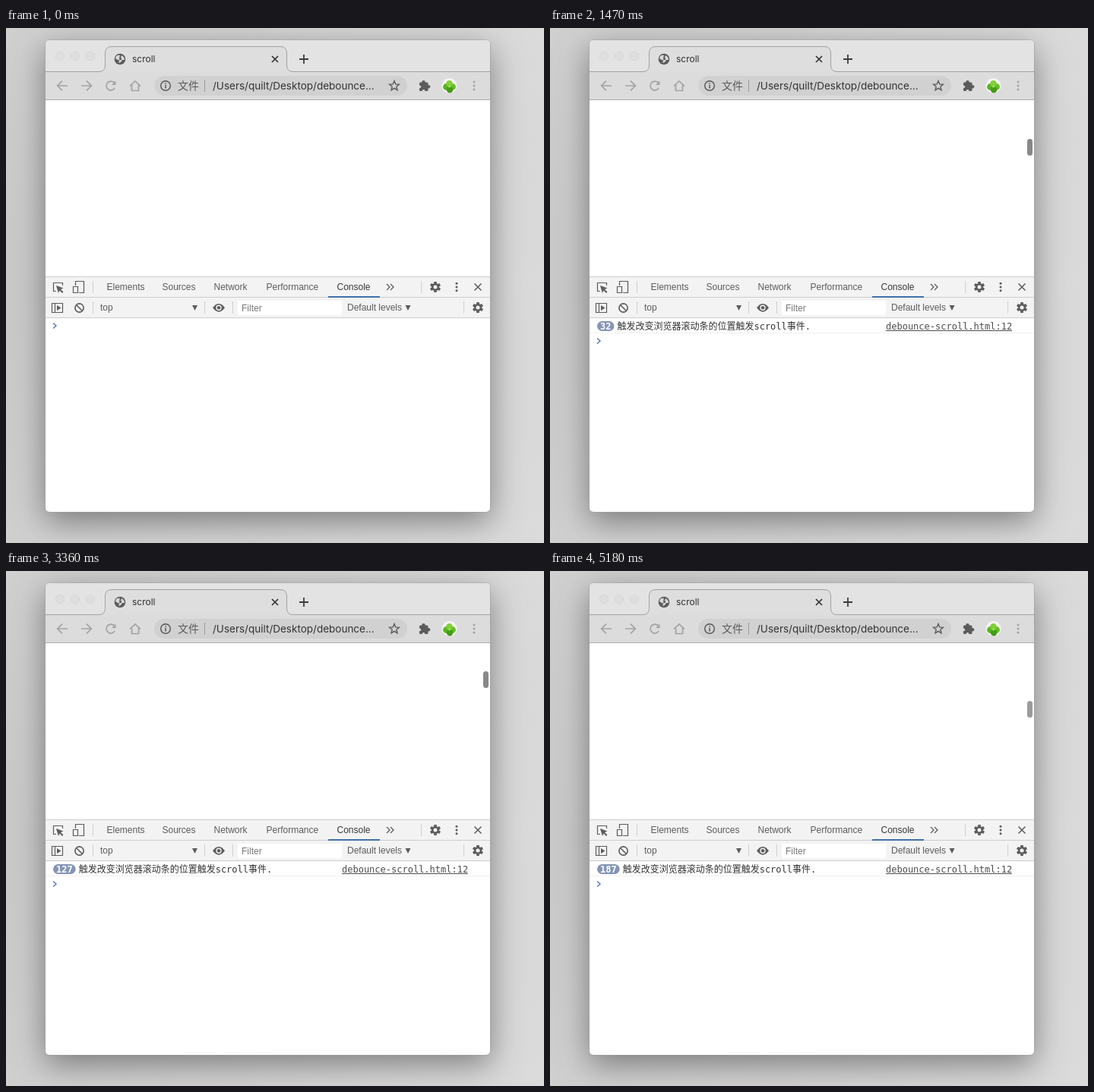
An HTML page with a canvas for the animation above (5.25 s loop, 708x678 px).

```html
<!DOCTYPE html>
<html lang="zh">
<head>
<meta charset="utf-8">
<title>scroll</title>
<style>
html, body { margin: 0; width: 708px; height: 678px; overflow: hidden; background: #d0d0d0; }
canvas { display: block; width: 708px; height: 678px; }
</style>
</head>
<body>
<canvas id="stage" width="708" height="678"></canvas>
<script>
const ctx = document.getElementById('stage').getContext('2d');
const LOOP = 5250, STEP = 70, TAU = Math.PI * 2;
const UI = 'Inter, "Noto Sans CJK SC", "Noto Sans CJK", sans-serif';
const SANS = '"Liberation Sans", Arial, sans-serif';
const MONO = '"DejaVu Sans Mono", "Noto Sans CJK SC", "Noto Sans CJK", monospace';
const INK = '#5c5c5c', FAINT = '#a3a3a3';

// time, logged events, scrollbar thumb top
const KEYS = [
  [770, 0, 97], [1470, 32, 146], [2660, 88, 185],
  [3360, 127, 132], [4200, 164, 158], [4690, 187, 171]
];

function scrollAt(t) {
  if (t <= KEYS[0][0]) return { count: 0, top: 97 };
  for (let i = 1; i < KEYS.length; i++) {
    const [t0, c0, y0] = KEYS[i - 1], [t1, c1, y1] = KEYS[i];
    if (t <= t1) {
      const p = (t - t0) / (t1 - t0);
      const e = i === 1 ? p : (1 - Math.cos(Math.PI * p)) / 2;
      return { count: Math.round(c0 + (c1 - c0) * p), top: Math.round(y0 + (y1 - y0) * e) };
    }
  }
  return { count: 187, top: 171 };
}

function rect(x, y, w, h, fill) {
  ctx.fillStyle = fill;
  ctx.fillRect(x, y, w, h);
}

function pill(x, y, w, h, r, fill) {
  ctx.beginPath();
  ctx.roundRect(x, y, w, h, r);
  ctx.fillStyle = fill;
  ctx.fill();
}

function disc(x, y, r, fill) {
  ctx.beginPath();
  ctx.arc(x, y, r, 0, TAU);
  ctx.fillStyle = fill;
  ctx.fill();
}

function ring(x, y, r, color, width = 1.5, from = 0, to = TAU) {
  ctx.beginPath();
  ctx.arc(x, y, r, from, to);
  ctx.strokeStyle = color;
  ctx.lineWidth = width;
  ctx.stroke();
}

function stroke(path, color, width = 1.5) {
  ctx.strokeStyle = color;
  ctx.lineWidth = width;
  ctx.stroke(new Path2D(path));
}

function fill(path, color) {
  ctx.fillStyle = color;
  ctx.fill(new Path2D(path));
}

function text(s, x, y, font, color) {
  ctx.font = font;
  ctx.fillStyle = color;
  ctx.fillText(s, x, y);
}

function gradient(x0, y0, x1, y1, ...colors) {
  const g = ctx.createLinearGradient(x0, y0, x1, y1);
  colors.forEach((c, i) => g.addColorStop(i / (colors.length - 1), c));
  return g;
}

function dots(x, y, gap, r, color) {
  for (let i = -1; i < 2; i++) disc(x, y + i * gap, r, color);
}

function gear(x, y) {
  ctx.beginPath();
  for (let i = 0; i < 6; i++) {
    const a = i * TAU / 6 + TAU / 12;
    [[-.36, 5.2], [-.25, 7.3], [.25, 7.3], [.36, 5.2]].forEach(([d, r]) =>
      ctx.lineTo(x + Math.cos(a + d) * r, y + Math.sin(a + d) * r));
  }
  ctx.closePath();
  ctx.moveTo(x + 2.5, y);
  ctx.arc(x, y, 2.5, 0, TAU, true);
  ctx.fillStyle = INK;
  ctx.fill('evenodd');
}

function star(x, y) {
  ctx.beginPath();
  for (let i = 0; i < 10; i++) {
    const a = i * TAU / 10 - TAU / 4, r = i % 2 ? 3 : 6.7;
    ctx.lineTo(x + Math.cos(a) * r, y + Math.sin(a) * r);
  }
  ctx.closePath();
  ctx.strokeStyle = INK;
  ctx.lineWidth = 1.4;
  ctx.stroke();
}

function backdrop() {
  rect(0, 0, 708, 678, gradient(0, 0, 708, 0, '#c9c9c9', '#d0d0d0', '#dadada'));
  rect(0, 0, 708, 678, gradient(0, 0, 0, 678, 'rgba(220,220,220,.35)', 'rgba(205,205,205,0)', 'rgba(222,222,222,.3)'));
  ctx.save();
  ctx.shadowColor = 'rgba(0,0,0,.42)';
  ctx.shadowBlur = 42;
  ctx.shadowOffsetY = 12;
  pill(52, 16, 585, 621, 5, '#fff');
  ctx.restore();
  pill(51.4, 15.4, 586.2, 622.2, 5.5, '#a0a0a0');
  pill(52, 16, 585, 621, 5, '#fff');
}

function tabStrip() {
  ctx.beginPath();
  ctx.roundRect(52, 16, 585, 79, [5, 5, 0, 0]);
  ctx.fillStyle = '#e3e3e3';
  ctx.fill();
  rect(52, 57, 585, 38, '#dcdcdc');
  const tab = 'M52 57.5H122Q130.5 57.5 130.5 49V33Q130.5 24.5 139 24.5H361Q369.5 24.5 369.5 33V49Q369.5 57.5 378 57.5H637';
  fill(tab, '#dedede');
  stroke(tab, '#a2a2a2', 1);
  [71, 91, 111].forEach(x => {
    disc(x, 37, 6, '#dedede');
    ring(x, 37, 5.6, '#d5d5d5', .8);
  });
  disc(150, 41, 7.3, INK);
  fill('M145 37Q148 35 150 36L149 39L152 40L151 43L147 42L144 40Z', '#d9d9d9');
  fill('M152 36Q156 38 156 42L153 42L151 45L148 46L149 43L152 42L151 39Z', '#d9d9d9');
  disc(150.5, 40.5, 1.6, INK);
  text('scroll', 166, 45, '12px ' + UI, '#2f2f2f');
  stroke('M350 37L358 45M358 37L350 45', '#333', 1.7);
  stroke('M386 41H398M392 35V47', '#3c3c3c', 1.8);
}

function toolbar() {
  stroke('M81 76H68M74 69.7L67.7 76L74 82.3', FAINT, 1.7);
  stroke('M99 76H112M106 69.7L112.3 76L106 82.3', FAINT, 1.7);
  ring(138, 76, 5.9, FAINT, 1.7, .5, TAU - .75);
  fill('M144.5 69.5V75H139Z', FAINT);
  stroke('M163 76.5L170 70L177 76.5M165.5 75V82.5H174.5V75', FAINT, 1.7);
  pill(195, 63, 333, 26, 13, '#d1d1d1');
  ring(210, 76, 6.3, '#555', 1.4);
  rect(209.3, 75, 1.5, 4.5, '#555');
  rect(209.3, 72.3, 1.5, 1.5, '#555');
  text('文件', 226, 81, '14px "Noto Sans CJK SC", "Noto Sans CJK", sans-serif', '#5a5a5a');
  rect(261, 68, 1, 16, '#9c9c9c');
  text('/Users/quilt/Desktop/debounce...', 272, 81, '13.5px ' + UI, '#333');
  star(511, 76.3);
  pill(544, 71.5, 11.5, 11.5, 1.5, INK);
  disc(549.5, 71.3, 2.3, INK);
  disc(556, 77.3, 2.3, INK);
  disc(544.2, 77.3, 1.9, '#dcdcdc');
  disc(549.5, 83, 1.9, '#dcdcdc');
  disc(583.5, 76, 10, '#f4f4f4');
  disc(579.5, 77.5, 4.4, '#57b51d');
  disc(587.5, 77.5, 4.4, '#63bd26');
  disc(583.5, 73.2, 4.3, '#80cf36');
  disc(584, 81.2, 4.2, '#459c17');
  disc(583.5, 77, 1.5, '#a4de68');
  dots(616, 76, 5, 1.5, FAINT);
  rect(52, 94, 585, 1, '#adadad');
}

function devtools() {
  rect(52, 327, 585, 55, '#f3f3f3');
  [327, 354, 381].forEach(y => rect(52, y, 585, 1, '#cdcdcd'));
  rect(424, 353, 68, 2, '#3f71aa');

  stroke('M66 346.5H62.5V335.5H74.5V339', INK, 1.2);
  fill('M66 339L75.5 342.5L72 344L75.5 347.5L74 349L70.5 345.5L69 349Z', INK);
  stroke('M91.5 339V333.5H102.5V348.5H96', INK, 1.2);
  stroke('M88.5 340.5H94.5V348.5H88.5Z', INK, 1.2);
  [['Elements', 132.5], ['Sources', 205.5], ['Network', 273.5], ['Performance', 342.5], ['Console', 435.5]]
    .forEach(([s, x]) => text(s, x, 345, '12px ' + SANS, s === 'Console' ? '#3a3a3a' : INK));
  stroke('M501 337L505 341L501 345M506 337L510 341L506 345', INK, 1.3);
  gear(565, 341);
  dots(593, 341, 4.7, 1.5, INK);
  stroke('M616.5 336.5L625.5 345.5M625.5 336.5L616.5 345.5', INK, 1.5);

  stroke('M60.5 362.5H74.5V374.5H60.5ZM64.5 362.5V374.5', INK, 1.2);
  fill('M67 365L72.5 368.5L67 372Z', INK);
  ring(96.5, 368.5, 5.6, INK, 1.6);
  stroke('M92.5 364.5L100.5 372.5', INK, 1.6);
  text('top', 124, 372, '12px ' + SANS, INK);
  fill('M245 365H252L248.5 372Z', INK);
  fill('M272 368.3Q280 357.5 288 368.3Q280 379 272 368.3Z', INK);
  disc(280, 368.3, 3.7, '#f3f3f3');
  disc(280, 368.3, 2.2, INK);
  rect(305, 359, 137, 19, '#fff');
  text('Filter', 310, 373, '12px ' + SANS, '#777');
  text('Default levels', 449, 372, '12px ' + SANS, INK);
  fill('M525.5 365H532.5L529 372Z', INK);
  gear(621, 368);
  [[114, 333], [546, 333], [114, 360], [261, 360], [298, 360], [602, 360]]
    .forEach(([x, y]) => rect(x, y, 1, 16, '#cfcfcf'));
}

function logRow(count) {
  let x = 62;
  if (count > 1) {
    const w = String(count).length * 7.22 + 8;
    pill(x, 386, w, 13, 6.5, '#8595b5');
    text(String(count), x + 4, 397, 'bold 12px ' + MONO, '#fff');
    x += w + 4;
  }
  text('触发改变浏览器滚动条的位置触发scroll事件.', x, 397, '12px ' + MONO, '#333');
  text('debounce-scroll.html:12', 442, 397, '12px ' + MONO, '#4c4c4c');
  rect(442, 398, 166, 1, '#4c4c4c');
  rect(52, 401, 585, 1, '#f0f0f0');
}

function draw(t) {
  const { count, top } = scrollAt(t);
  backdrop();
  tabStrip();
  toolbar();
  devtools();
  if (count) {
    logRow(count);
    ctx.globalAlpha = t > 5110 ? .84 : 1;
    pill(628, top, 7, 22, 3.5, '#888');
    ctx.globalAlpha = 1;
  }
  const y = count ? 412 : 392;
  stroke(`M62 ${y - 3.5}L66 ${y}L62 ${y + 3.5}`, '#5578bd', 1.5);
}

let start, last = -1;
function tick(now) {
  start ??= now;
  const step = Math.floor(((now - start) % LOOP) / STEP);
  if (step !== last) draw(step * STEP);
  last = step;
  requestAnimationFrame(tick);
}
draw(0);
requestAnimationFrame(tick);
</script>
</body>
</html>
```
